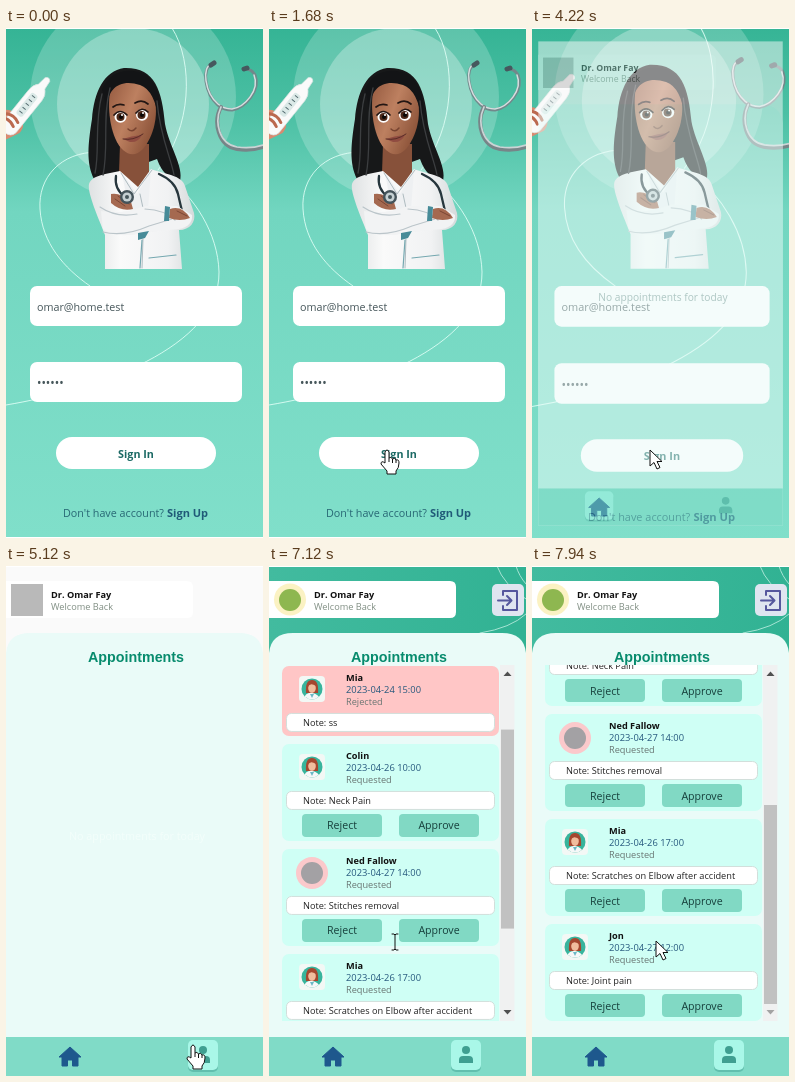
Recreate the animation shown at these times as an HTML page. Size 257 by 510 pixels, loop 8 s.

```html
<!DOCTYPE html>
<html lang="en">
<head>
<meta charset="utf-8">
<title>Clinic sign-in and appointments</title>
<style>
  html, body { margin: 0; width: 100%; height: 100%; overflow: hidden; background: #fff; }
  svg { display: block; width: 100%; height: 100%; font: 9.2px "Open Sans", "Noto Sans", sans-serif; }
  .bold { font-weight: 700; }
  .mid { text-anchor: middle; }
  .line { fill: none; stroke-linecap: round; stroke-linejoin: round; }
  .big { font-size: 10.75px; }
  .image, #list, #heading { display: none; }
  .loaded .image, .listed #list, .visits #heading { display: inline; }
  .loaded .blank { display: none; }
</style>
</head>
<body>
<svg id="stage" viewBox="0 0 257 510">
  <defs>
    <linearGradient id="sky" x2="0" y2="1">
      <stop offset="0" stop-color="#35b495"/><stop offset=".17" stop-color="#4cc0a4"/>
      <stop offset=".36" stop-color="#72d6c0"/><stop offset="1" stop-color="#80dfca"/>
    </linearGradient>
    <linearGradient id="strip" x2="1" y2="0">
      <stop offset="0" stop-color="#42bb9f"/><stop offset="1" stop-color="#31b293"/>
    </linearGradient>
    <linearGradient id="coat" x2="1" y2="0">
      <stop offset="0" stop-color="#dfe2e3"/><stop offset=".3" stop-color="#fafafa"/>
      <stop offset=".75" stop-color="#f1f2f3"/><stop offset="1" stop-color="#d5dadb"/>
    </linearGradient>
    <linearGradient id="skin" x2="1" y2=".6">
      <stop offset="0" stop-color="#955a40"/><stop offset=".5" stop-color="#bd8060"/><stop offset="1" stop-color="#8d543a"/>
    </linearGradient>
    <clipPath id="buttonClip"><rect x="50" y="409" width="160" height="32" rx="16"/></clipPath>
    <clipPath id="listClip"><rect x="13" y="99" width="218" height="356"/></clipPath>
    <clipPath id="faceClip"><circle r="10.5"/></clipPath>

    <g id="woman">
      <rect x="-13" y="-13" width="26" height="26" rx="4" fill="#f3f8f5"/>
      <circle r="10.5" fill="#38b49c"/>
      <g clip-path="url(#faceClip)">
        <path d="M-6 4Q-7-9 0-9T6 4z" fill="#a5472f"/>
        <path d="M-9 12Q-7 3 0 4T9 12z" fill="#f6f8f8"/>
        <ellipse cy="-1" rx="3.8" ry="5" fill="#f1bd9d"/>
        <path d="M-4-2Q-2-7 4-3L3-7H-3z" fill="#a5472f"/>
        <path d="M-2 5L0 9 2 5z" fill="#6bb8c4"/>
      </g>
    </g>
    <g id="pet"><circle r="16" fill="#fbc9cb"/><circle r="11" fill="#a3a1a4"/></g>
  </defs>

  <g id="login">
    <rect y="1" width="257" height="508" fill="url(#sky)"/>
    <circle cx="127" cy="69" r="103" fill="#fff" opacity=".2"/>
    <circle cx="127" cy="76" r="76" fill="#fff" opacity=".28"/>
    <path class="line" stroke="#e2fff7" opacity=".85" d="M166 0C188 34 186 100 152 142M0 377C90 362 214 320 213 244C212 205 188 168 160 148M92 124C54 124 32 150 34 181C36 215 58 240 84 258"/>

    <g transform="translate(20 78) rotate(39)">
      <path d="M-9 13Q-20 18-23 35L4 42 12 25Q12 15 5 14z" fill="#d98a70"/>
      <path d="M-3-34Q0-38 3-34L4-25Q9-21 9-14V27Q8 34 0 34T-8 27V-14Q-8-21-4-25z" fill="#fafafa" stroke="#d9e5e2" stroke-width=".7"/>
      <rect x="-4" y="-15" width="8" height="27" rx="3" fill="#dbe9e7"/>
      <path d="M-2-12H2M-2-7H2M-2-2H2M-2 3H2M-2 8H2" stroke="#556c70"/>
      <path class="line" d="M-10 18Q-3 14 4 18M-12 24Q-4 20 3 24" stroke="#bb694f" stroke-width="3"/>
    </g>

    <g class="line">
      <path d="M206 37C195 39 199 66 212 77Q218 82 226 82C239 80 255 62 249 47Q246 41 239 41" stroke="#72888b" stroke-width="3"/>
      <path d="M206 36C195 38 199 65 212 76Q218 81 226 81C239 79 254 62 248 47" stroke="#d5dedf" stroke-width="1.5"/>
      <path d="M215 79C207 94 212 118 231 121Q245 123 257 119" stroke="#778588" stroke-width="4"/>
      <path d="M215 79C208 94 213 116 231 119Q245 121 257 117" stroke="#cbd4d5" stroke-width="1.7"/>
      <path d="M205 37L208 35M238 41L241 40" stroke="#46585e" stroke-width="5"/>
    </g>

    <g id="doctor">
      <path d="M118 40C98 43 88 64 86 91C82 116 80 135 88 151Q102 156 118 143L151 131Q158 151 174 153C178 139 163 118 159 96C156 62 149 39 118 40z" fill="#171819"/>
      <path d="M114 116H143V145L132 160 113 145z" fill="#87513a"/>
      <path d="M114 143C101 146 86 147 83 156C81 165 93 191 99 207V241H176L173 202C184 202 190 194 188 185L179 158C176 147 158 146 145 141L132 159z" fill="url(#coat)"/>
      <path d="M116 145L131 166 145 142 142 182H123z" fill="#eef0f2"/>
      <path class="line" d="M115 145L128 166 146 142M134 166L137 180M137 211L136 240" stroke="#aebbc0"/>
      <path d="M104 64C110 50 138 49 148 69C153 86 148 108 137 121Q127 131 117 122C105 111 101 83 104 64z" fill="url(#skin)"/>
      <path d="M101 84C100 58 116 51 134 57Q149 62 153 94C157 76 152 49 133 44Q107 38 96 61z" fill="#131416"/>
      <path class="line" d="M96 66C88 97 94 123 89 145M104 60C96 91 103 119 97 147M151 73C154 109 165 130 168 147" stroke="#3c3e40" stroke-width="1.3"/>
      <g>
        <ellipse cx="114.5" cy="89" rx="6" ry="5.7" fill="#fff"/><ellipse cx="136" cy="87" rx="6" ry="5.7" fill="#fff"/>
        <circle cx="114.5" cy="89" r="4" fill="#4b2819"/><circle cx="135.5" cy="87" r="4" fill="#4b2819"/>
        <circle cx="115" cy="89" r="2" fill="#080707"/><circle cx="136" cy="87" r="2" fill="#080707"/>
        <circle cx="116" cy="87" r="1" fill="#fff"/><circle cx="137" cy="85" r="1" fill="#fff"/>
        <path class="line" d="M108 87Q114 80 121 87M130 85Q136 78 142 84M107 79Q112 75 118 77M129 75Q136 71 142 76" stroke="#231613" stroke-width="1.7"/>
        <path class="line" d="M122 101Q126 105 130 100" stroke="#774330" stroke-width="1.5"/>
        <path d="M117 111Q125 108 136 107Q132 115 124 114z" fill="#904c41"/>
        <path class="line" d="M117 111Q127 113 137 106" stroke="#5a2d27"/>
      </g>
      <path class="line" d="M110 148Q108 161 119 169M153 146Q169 153 172 166T177 187" stroke="#27363d" stroke-width="2.3"/>
      <path d="M95 183Q115 187 139 178L171 178 186 187Q187 198 173 201L137 205Q110 211 97 201z" fill="#f2f3f4"/>
      <path class="line" d="M97 204Q118 209 143 198L166 191M94 179Q110 190 131 186M139 181Q159 182 169 192" stroke="#bbc5ca" stroke-width="1.2"/>
      <path d="M105 166Q114 164 125 174L127 181Q115 184 105 175zM164 181Q176 177 184 190Q174 194 163 190z" fill="#a56950"/>
      <path class="line" d="M109 171L119 178M112 168L123 176M171 183L181 188" stroke="#7a4634"/>
      <path d="M132 205L143 203 139 210 132 212zM159 178L164 179 163 193 158 193z" fill="#478b98"/>
      <circle cx="121" cy="169" r="7" fill="#44535a"/><circle cx="121" cy="169" r="4.6" fill="#c5d0d3"/><circle cx="121" cy="169" r="2" fill="#45555b"/>
      <path class="line" d="M136 212L134 240M143 230L170 227" stroke="#75a8b0" stroke-width="1.2"/>
    </g>

    <g fill="#fff">
      <rect x="24" y="258" width="212" height="40" rx="7"/>
      <rect x="24" y="334" width="212" height="40" rx="7"/>
      <rect x="50" y="409" width="160" height="32" rx="16"/>
    </g>
    <circle id="ripple" cx="118" cy="425" fill="#7fdcc8" clip-path="url(#buttonClip)"/>
    <g class="big" fill="#46565a">
      <text x="31" y="283">omar@home.test</text>
      <text x="31" y="359" font-size="11.8">••••••</text>
      <text class="bold mid" x="130" y="429.5" fill="#1b6964">Sign In</text>
      <text x="57" y="489" fill="#286875">Don't have account?</text>
      <text class="bold" x="161" y="489" fill="#205a78" font-size="11">Sign Up</text>
    </g>
  </g>

  <g id="app">
    <rect y="1" width="257" height="509" fill="#fafafa"/>
    <g class="image">
      <rect y="1" width="257" height="110" fill="url(#strip)"/>
      <path class="line" d="M228 0Q235 19 257 33M247 0Q250 10 257 18M211 67Q242 62 257 48" stroke="#a6e4d4"/>
    </g>
    <path d="M0 15H181Q187 15 187 21V46Q187 52 181 52H0z" fill="#fff"/>
    <rect class="blank" x="5" y="18" width="32" height="32" fill="#b9b9b9"/>
    <g class="image">
      <circle cx="21" cy="33.5" r="16" fill="#fbf2c3"/><circle cx="21" cy="34" r="11" fill="#8eb750"/>
      <rect x="223" y="18" width="32" height="32" rx="5" fill="#dfe5f0"/>
      <path class="line" d="M234 29V25H248V44H234V40M229 34.5H242M238 30L242.500 34.5 238 39" stroke="#55579d" stroke-width="2"/>
    </g>
    <text class="bold" x="45" y="32" fill="#111">Dr. Omar Fay</text>
    <text x="45" y="44" fill="#7f8d82">Welcome Back</text>
    <path d="M0 471V87Q2 67 24 67H233Q255 67 257 87V471z" fill="#eafbf8"/>
    <text id="notice" class="mid big" x="131" y="274">No appointments for today</text>
    <text id="heading" class="bold mid" x="130" y="96" fill="#078b6d" style="font:700 14.3px 'Liberation Sans',Arial,sans-serif">Appointments</text>

    <g id="list">
      <g clip-path="url(#listClip)"><g id="cards"></g></g>
      <rect x="231" y="99" width="14.500" height="356" fill="#f0f1f1"/>
      <rect id="thumb" x="232" y="116" width="13" height="199" fill="#c1c1c1"/>
      <path id="up" d="M234.500 110L238.500 105.500 242.500 110z"/>
      <path id="down" d="M234.500 444L238.500 448.500 242.500 444z"/>
    </g>

    <rect y="471" width="257" height="39" fill="#80dbc7"/>
    <g id="highlight">
      <rect x="182" y="476" width="30" height="30" rx="5" fill="#4eac9c" opacity=".6"/>
      <rect x="182" y="474" width="30" height="30" rx="5" fill="#a9f7e8"/>
    </g>
    <path d="M64 481L75 491H72V500H66.500V494H61.500V500H56V491H53z" fill="#1e588d" stroke="#1e588d" stroke-linejoin="round"/>
    <g fill="#3f9f91"><circle cx="197" cy="484" r="4"/><path d="M190 497V494Q190 490 194 490H200Q204 490 204 494V497z"/></g>
  </g>

  <g id="cursor" stroke-linejoin="round">
    <path id="arrow" d="M0 0V16L4 12.500 7 19 10 17.500 7 11.500H12z" fill="#fff" stroke="#111"/>
    <g id="hand" fill="#fff" stroke="#111">
      <path d="M-2 2Q0-2 2 2V8Q4 6 5.500 9Q8 7 9 10Q12 9 12 13Q12 18 9 21V24H0V21L-6 14Q-6 10-2 13z"/>
      <path d="M2 8V12M5.500 9V13M9 10V13" fill="none"/>
    </g>
    <path id="beam" class="line" d="M-2-8H0L1-7 2-8H4M1-7V7M-2 8H0L1 7 2 8H4" stroke="#111"/>
  </g>
  <rect width="257" height="1" fill="#fff"/>
</svg>

<script>
const LOOP = 8000, MAX_SCROLL = 220;
const el = id => document.getElementById(id);
const clamp = v => Math.max(0, Math.min(1, v));

const colors = { Approved: '#baffbf', Rejected: '#ffc6c6', Requested: '#cffff5' };
const visits = [
  ['Ned Fallow', '2023-04-21 12:00', 'Approved', 'Backpain', 'pet'],
  ['Mia', '2023-04-24 15:00', 'Rejected', 'ss', 'woman'],
  ['Colin', '2023-04-26 10:00', 'Requested', 'Neck Pain', 'woman'],
  ['Ned Fallow', '2023-04-27 14:00', 'Requested', 'Stitches removal', 'pet'],
  ['Mia', '2023-04-26 17:00', 'Requested', 'Scratches on Elbow after accident', 'woman'],
  ['Jon', '2023-04-27 12:00', 'Requested', 'Joint pain', 'woman'],
];

const button = (x, label) => `
  <rect x="${x}" y="70" width="80" height="23" rx="4" fill="#81d9c4"/>
  <text class="mid" x="${x + 40}" y="85.5" font-size="10.6" fill="#163f3b">${label}</text>`;

let nextTop = 107;
el('cards').innerHTML = visits.map(([name, date, status, note, avatar]) => {
  const open = status === 'Requested', height = open ? 97 : 70, y = nextTop;
  nextTop += height + 8;
  return `<g transform="translate(0 ${y})">
    <rect x="13" width="217" height="${height}" rx="7" fill="${colors[status]}"/>
    <use class="image" href="#${avatar}" x="43" y="${avatar === 'pet' ? 24 : 23}"/>
    <text class="bold" x="77" y="15" fill="#111">${name}</text>
    <text x="77" y="27" font-size="9.35" fill="#24577c">${date}</text>
    <text x="77" y="39" fill="#687572">${status}</text>
    <rect x="17.5" y="47.5" width="208" height="18" rx="5" fill="#fff" stroke="#d2dfdb"/>
    <text x="34" y="60" fill="#222">Note: ${note}</text>
    ${open ? button(33, 'Reject') + button(130, 'Approve') : ''}
  </g>`;
}).join('');

// Progress from 0 to 1 in n visible changes, the first at start and the last at end.
const steps = (t, start, end, n) =>
  t < start ? 0 : Math.min(n, 1 + Math.floor((t - start) / (end - start) * (n - 1) + 1e-6)) / n;
const easeOut = p => 1 - (1 - p) ** 1.62;

const cursorPath = [
  [390, 177, 456], [700, 150, 428], [1000, 118, 411], [1070, 118, 422],
  [4250, 118, 422], [4600, 180, 468], [4899, 180, 468], [4900, 186, 467],
  [5119, 186, 467], [5120, 187, 479], [6120, 187, 479], [6380, 125, 376],
  [7659, 125, 376], [7660, 124, 375], [LOOP, 124, 375],
];
const cursorKinds = [[0, 'arrow'], [600, 'hand'], [4080, 'arrow'], [4560, 'hand'], [6240, 'beam'], [7660, 'arrow']];

function drawCursor(t) {
  el('cursor').style.display = t < 390 ? 'none' : '';
  if (t < 390) return;
  const i = cursorPath.findIndex(p => p[0] > t);
  const [t0, x0, y0] = cursorPath[i - 1], [t1, x1, y1] = cursorPath[i];
  const p = (t - t0) / (t1 - t0);
  el('cursor').setAttribute('transform', `translate(${x0 + (x1 - x0) * p} ${y0 + (y1 - y0) * p})`);
  const kind = cursorKinds.filter(k => k[0] <= t).pop()[1];
  for (const id of ['arrow', 'hand', 'beam']) el(id).style.display = id === kind ? '' : 'none';
}

const zoom = s => `translate(128.5 255) scale(${s}) translate(-128.5 -255)`;

function render(t) {
  const press = steps(t, 1280, 1680, 6);
  el('ripple').setAttribute('r', 150 * press);
  el('ripple').setAttribute('opacity', .35 * (1 - press));

  const enter = steps(t, 4080, 4630, 9), shown = clamp((enter - 1 / 9) * 2.25);
  el('login').setAttribute('transform', zoom(1 + .045 * enter));
  el('app').setAttribute('transform', zoom(.85 + .15 * easeOut(shown)));
  el('app').setAttribute('opacity', shown);

  const load = steps(t, 5120, 5390, 4), visiting = load > 0;
  const shows = el('stage').classList;
  shows.toggle('visits', visiting);
  shows.toggle('listed', load >= .5);
  shows.toggle('loaded', visiting ? load >= .75 : enter >= 7 / 9);
  el('highlight').setAttribute('transform', `translate(${visiting ? 0 : -133} 0)`);
  el('notice').setAttribute('fill', visiting ? '#f3fefb' : '#5f8f89');
  el('notice').setAttribute('opacity', load < .5 ? 1 : 0);

  const scroll = MAX_SCROLL / 2 * (easeOut(steps(t, 6980, 7260, 5)) + easeOut(steps(t, 7590, 7940, 6)));
  el('cards').setAttribute('transform', `translate(0 ${-scroll})`);
  el('thumb').setAttribute('y', 116 + scroll * 123 / MAX_SCROLL);
  el('up').setAttribute('fill', scroll > 0 ? '#505050' : '#a3a3a3');
  el('down').setAttribute('fill', scroll < MAX_SCROLL ? '#505050' : '#a3a3a3');

  drawCursor(t);
}

const begin = performance.now();
function tick() {
  render((performance.now() - begin) % LOOP);
  requestAnimationFrame(tick);
}
tick();
</script>
</body>
</html>
```
